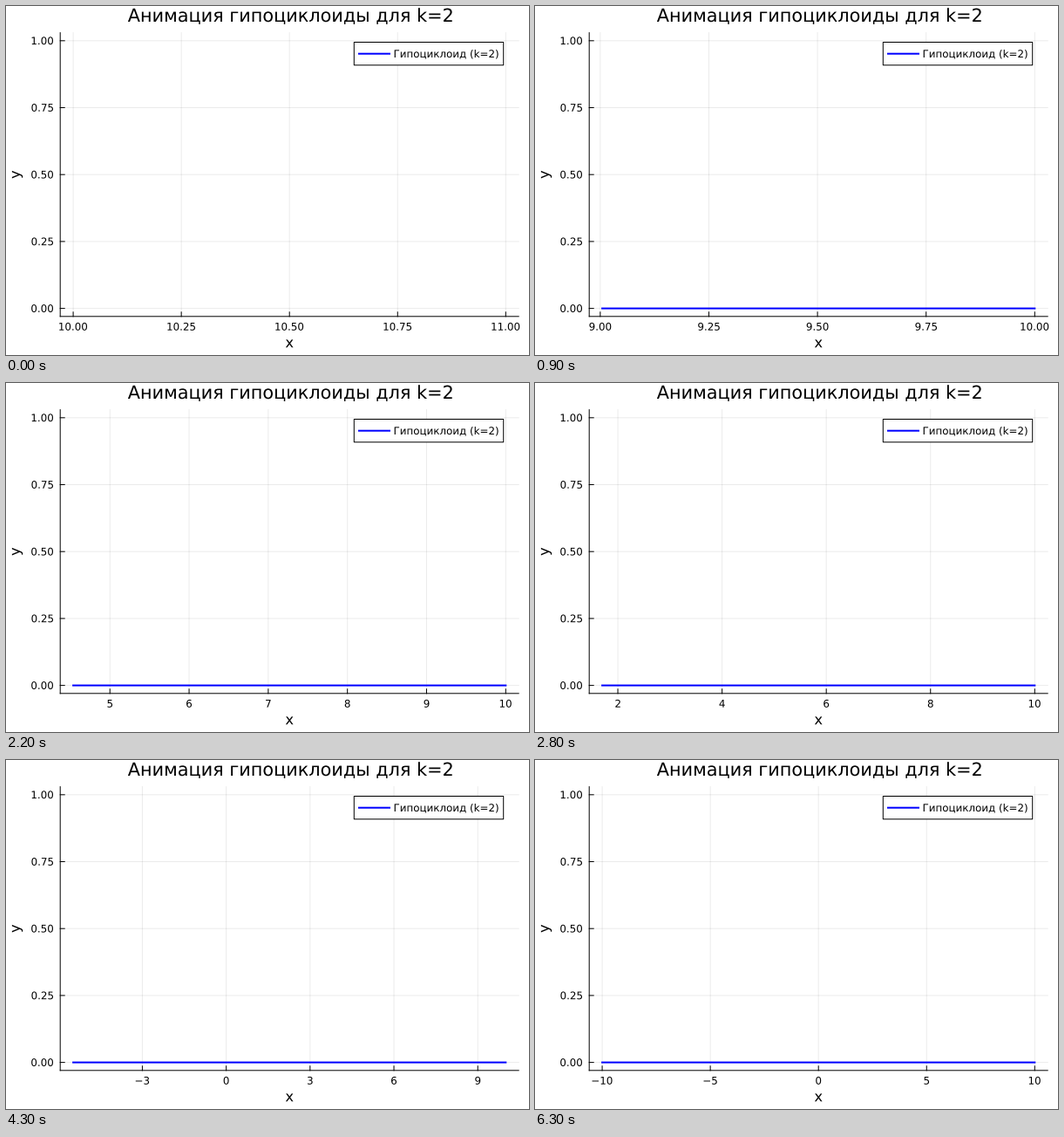
A matplotlib script that plays this animation: 600 by 400 pixels, repeating every 8 s.

```python
import math

import matplotlib.pyplot as plt
from matplotlib.animation import FuncAnimation
from matplotlib.patches import PathPatch, Rectangle
from matplotlib.textpath import TextPath
from matplotlib.transforms import Affine2D

W, H = 600, 400
PX = 0.72                      # points per pixel at 100 dpi
LEFT, RIGHT, TOP, BOTTOM = 62.2, 588.2, 30.6, 355.8
RADIUS, STEP, LAST = 10, 0.05, 63
NICE = [(1.0, 1.0), (5.0, 0.9), (2.0, 0.7), (2.5, 0.5), (3.0, 0.2)]

plt.rcParams["font.family"] = "DejaVu Sans"
fig = plt.figure(figsize=(W / 100, H / 100), dpi=100, facecolor="white")
ax = fig.add_axes([0, 0, 1, 1])
ax.set_xlim(0, W)
ax.set_ylim(H, 0)
ax.axis("off")


def line(x0, y0, x1, y1, width=1.0, color="black", z=3, **kw):
    return ax.plot([x0, x1], [y0, y1], color=color, lw=width * PX, zorder=z,
                   snap=False, **kw)[0]


def text(s, x, y, size, align="center", turn=0):
    """Draw s with its baseline at y, aligned on its inked width."""
    path = TextPath((0, 0), s, size=size)
    box = path.get_extents()
    dx = {"left": box.x0, "center": (box.x0 + box.x1) / 2, "right": box.x1}[align]
    move = Affine2D().translate(-dx, 0).scale(1, -1).rotate_deg(turn).translate(x, y)
    patch = PathPatch(move.transform_path(path), fc="black", lw=0, zorder=4, snap=False)
    return ax.add_patch(patch)


def grid(x0, y0, x1, y1):
    return line(x0, y0, x1, y1, color="black", alpha=0.08, z=1)


def find_ticks(lo, hi, k_min=4, k_max=8, k_ideal=5):
    """Pick round tick values by granularity, zero, coverage and niceness."""
    span = hi - lo
    z = math.ceil(math.log10(span))
    best, ticks = -math.inf, []
    while 2 * k_max * 10 ** (z + 1) > span:
        for k in range(k_min, 2 * k_max + 1):
            for q, nice in NICE:
                step = q * 10.0 ** z
                reach = (k - 1) * step
                if reach >= 2 * span:
                    continue
                r = math.ceil((hi - reach) / step)
                while r * step <= lo:
                    vals = [(r + i) * step for i in range(k)]
                    vals = [v for v in vals if lo <= v <= hi]
                    n = len(vals)
                    if k_min <= n <= k_max:
                        score = (1 - abs(n - k_ideal) / k_ideal) / 4
                        score += (r <= 0 and abs(r) < k) / 6
                        score += 0.5 * span / ((n - 1) * step) + nice / 4
                        if score > best + 1e-9:
                            best, ticks = score, vals
                    r += 1
        z -= 1
    return ticks


def labels(ticks):
    digits = 0
    while any(abs(round(t, digits) - t) > 1e-8 for t in ticks):
        digits += 1
    return [f"{round(t, digits) + 0.0:.{digits}f}".replace("-", "\u2212")
            for t in ticks]


# fixed parts
for i in range(5):
    y = BOTTOM - (BOTTOM - TOP) * (0.03 + i / 4) / 1.06
    grid(LEFT, y, RIGHT, y)
    line(LEFT, y, LEFT + 5, y)
    text(f"{i / 4:.2f}", 54, y + 4.3, 11.87, "right")
line(LEFT, TOP, LEFT, BOTTOM)
line(LEFT, BOTTOM, RIGHT, BOTTOM)

MID = (LEFT + RIGHT) / 2
text("Анимация гипоциклоиды для k=2", MID + 0.6, 18, 20.8)
text("x", MID, 391.3, 16.3)
text("y", 15.8, (TOP + BOTTOM) / 2, 16.3, turn=-90)

ax.add_patch(Rectangle((399.3, 41.5), 171.4, 26.3, fc="white", ec="black",
                       lw=PX, zorder=3, snap=False))
line(405, 54.7, 440, 54.7, 2, "blue", 4)
text("Гипоциклоид (k=2)", 445.7, 59, 11.87, "left")

Y0 = BOTTOM - (BOTTOM - TOP) * 0.03 / 1.06
PAD = (RIGHT - LEFT) * 0.03 / 1.06
curve = line(LEFT + PAD, Y0, RIGHT - PAD, Y0, 2, "blue", 5)
moving = []


def draw(frame):
    while moving:
        moving.pop().remove()
    n = min(frame, LAST)
    lo, hi = (RADIUS * math.cos(STEP * n), RADIUS) if n else (RADIUS, RADIUS + 1)
    curve.set_visible(n > 0)
    pad = 0.03 * (hi - lo)
    lo, hi = lo - pad, hi + pad
    ticks = find_ticks(lo, hi)
    for t, s in zip(ticks, labels(ticks)):
        x = LEFT + (RIGHT - LEFT) * (t - lo) / (hi - lo)
        moving.append(grid(x, TOP, x, BOTTOM))
        moving.append(line(x, BOTTOM - 5, x, BOTTOM))
        moving.append(text(s, x, 371.7, 11.87))
    return [curve, *moving]


anim = FuncAnimation(fig, draw, frames=80, interval=100, repeat=True,
                     repeat_delay=0, init_func=lambda: draw(0), blit=False)
plt.show()
```
